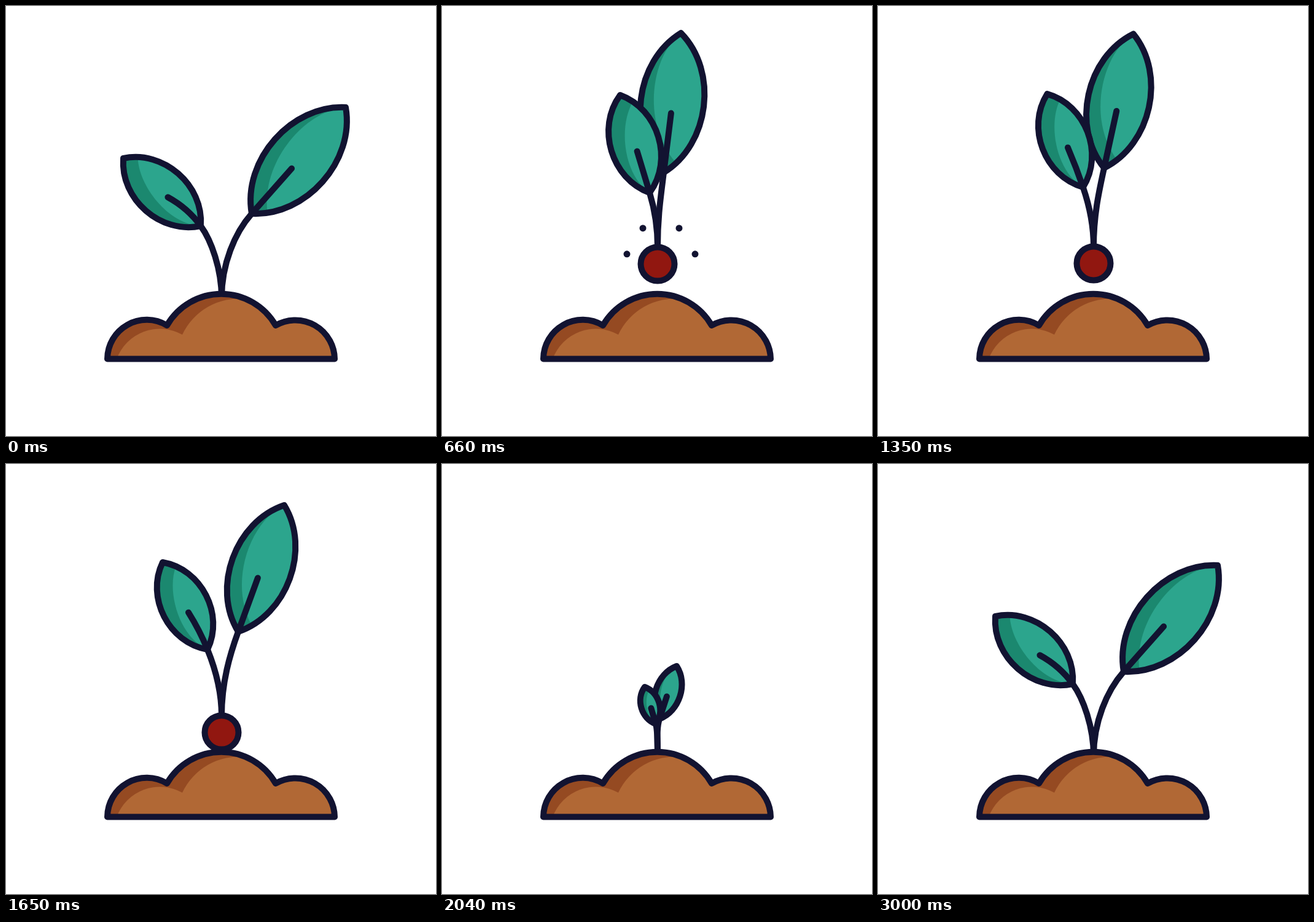
These frames come from a looping animation (700x700 px, 5130 ms). An HTML page with a canvas:

```html
<!DOCTYPE html>
<html lang="en">
<head>
<meta charset="utf-8">
<title>Sprout</title>
<style>
  html, body { margin: 0; width: 100%; height: 100%; overflow: hidden; background: #fff; }
  canvas { display: block; width: 100vmin; height: 100vmin; }
</style>
</head>
<body>
<canvas id="stage" width="700" height="700"></canvas>
<script>
const ctx = document.getElementById('stage').getContext('2d');
const LOOP = 5130, STEP = 30, CENTER = 351;
const INK = '#121331', LEAF = '#2ca58d', LEAF_SHADE = '#1b886f';
const SOIL = '#b16835', SOIL_SHADE = '#954a22', BULB = '#911710';

// foot y, right leaf base and tip, left leaf base and tip, left vein bend
const poses = {
  open:   [475, 400, 338, 553, 165, 317, 358, 191, 248, 8],
  taut:   [475, 365, 330, 394, 106, 334, 366, 290, 206, 0],
  pulled: [379, 361, 257, 389, 30, 338, 290, 290, 131, 0],
  sway:   [410, 378, 273, 453, 67, 328, 302, 255, 160, 3],
  seed:   [475, 351, 490, 352, 484, 351, 490, 350, 484, 0],
  sprout: [475, 354, 415, 382, 329, 348, 423, 330, 363, 0],
  young:  [475, 390, 352, 509, 188, 326, 371, 226, 261, 6]
};

const smooth = p => p * p * (3 - 2 * p);
const easeOut = power => p => 1 - (1 - p) ** power;

// time, pose, vertical shift, easing towards this step
const steps = [
  [0, 'open', 0],
  [270, 'taut', 0, smooth],
  [420, 'taut', -4, smooth],
  [540, 'pulled', 46, p => p * p],
  [840, 'pulled', -4, easeOut(2)],
  [960, 'pulled', 0, smooth],
  [1110, 'pulled', 0, smooth],
  [1650, 'sway', 0, smooth],
  [1890, 'sway', 0, smooth],
  [1891, 'seed', 0, smooth],
  [2040, 'sprout', 0, easeOut(1.3)],
  [2520, 'young', 0, easeOut(1.6)],
  [3000, 'open', 0, easeOut(2.3)]
];

const clamp = (v, lo = 0, hi = 1) => Math.min(hi, Math.max(lo, v));
const mix = (a, b, p) => a + (b - a) * p;
const shifted = ([, name, dy]) =>
  poses[name].map((v, i) => i === 0 || (i < 9 && i % 2 === 0) ? v + dy : v);

function poseAt(t) {
  const next = steps.findIndex(s => s[0] > t);
  if (next < 0) return poses.open;
  const a = steps[next - 1], b = steps[next];
  const p = b[3]((t - a[0]) / (b[0] - a[0]));
  const to = shifted(b);
  return shifted(a).map((v, i) => mix(v, to[i], p));
}

function outline(path) {
  ctx.strokeStyle = INK;
  ctx.lineWidth = 10;
  ctx.lineCap = ctx.lineJoin = 'round';
  ctx.stroke(path);
}

function dot(x, y, r, fill) {
  const path = new Path2D();
  path.arc(x, y, r, 0, Math.PI * 2);
  ctx.fillStyle = fill;
  ctx.fill(path);
  return path;
}

function shaded(shape, dark, light, lightShape) {
  ctx.fillStyle = dark;
  ctx.fill(shape);
  ctx.save();
  ctx.clip(shape);
  ctx.fillStyle = light;
  ctx.fill(lightShape);
  ctx.restore();
  outline(shape);
}

function drawLeaf(foot, bx, by, tx, ty, bend, isLeft) {
  const ax = tx - bx, ay = ty - by, length = Math.hypot(ax, ay);
  // Point along the leaf axis, offset to its left side
  const at = (along, side) => [bx + ax * along + ay * side, by + ay * along - ax * side];
  const bulge = isLeft ? .32 : .3;

  const blade = new Path2D();
  blade.moveTo(bx, by);
  blade.bezierCurveTo(...at(.24, bulge), ...at(.76, bulge), tx, ty);
  blade.bezierCurveTo(...at(.76, -bulge), ...at(.24, -bulge), bx, by);

  const light = new Path2D();
  if (isLeft) {
    light.moveTo(...at(.9, -.1));
    light.bezierCurveTo(...at(.72, .1), ...at(.25, .2), bx, by);
    light.lineTo(...at(0, -.5));
    light.lineTo(...at(.9, -.5));
  } else {
    light.moveTo(tx, ty);
    light.bezierCurveTo(...at(.8, .2), ...at(.3, .2), ...at(.06, -.1));
    light.lineTo(...at(.06, -.5));
    light.lineTo(...at(1, -.5));
  }
  shaded(blade, LEAF_SHADE, LEAF, light);

  const bow = at(.21, -bend / length);
  const reach = isLeft ? .17 : .18;
  const dx = bow[0] - bx, dy = bow[1] - by;
  const stem = new Path2D();
  stem.moveTo(CENTER, foot);
  stem.bezierCurveTo(CENTER, mix(foot, by, .4),
    bx - dx * reach / .21, by - dy * reach / .21, bx, by);
  stem.quadraticCurveTo(...bow, ...at(.425, 0));
  outline(stem);
}

function drawPlant(t) {
  const [foot, rbx, rby, rtx, rty, lbx, lby, ltx, lty, bend] = poseAt(t);
  ctx.save();
  if (t > 1650 && t < 1890) {
    const p = ((t - 1650) / 240) ** 2;
    ctx.translate(CENTER + 430 * p, 437 - 560 * p);
    ctx.rotate(.8 * p);
    ctx.translate(-CENTER, -437);
  }
  drawLeaf(foot, rbx, rby, rtx, rty, 0, false);
  drawLeaf(foot, lbx, lby, ltx, lty, bend, true);
  outline(dot(CENTER, foot + 27, 27.5, BULB));
  ctx.restore();
}

function drawCrumbs(t) {
  if (t < 540 || t >= 1110) return;
  const p = easeOut(3)(clamp((t - 540) / 480));
  const radius = 5.5 * clamp((1110 - t) / 90);
  for (const [dx, y] of [[96, 341], [51, 268]]) {
    for (const side of [-1, 1]) {
      dot(356.5 + side * dx * p, mix(490, y, p), radius, INK);
    }
  }
}

const mound = new Path2D(`M165 574.5A64 64 0 0 1 262 520A102 102 0 0 1 439 520
  A64 64 0 0 1 535 574.5Z`);
const moundLight = new Path2D(`M180 575A75 75 0 0 1 287 535A102 102 0 0 1 390 477
  L545 477V575Z`);

function draw(t) {
  ctx.fillStyle = '#fff';
  ctx.fillRect(0, 0, 700, 700);
  drawPlant(t);
  drawCrumbs(t);
  shaded(mound, SOIL_SHADE, SOIL, moundLight);
}

const start = performance.now();
function tick() {
  const t = (performance.now() - start) % LOOP;
  draw(Math.floor(t / STEP) * STEP);
  requestAnimationFrame(tick);
}
tick();
</script>
</body>
</html>
```
